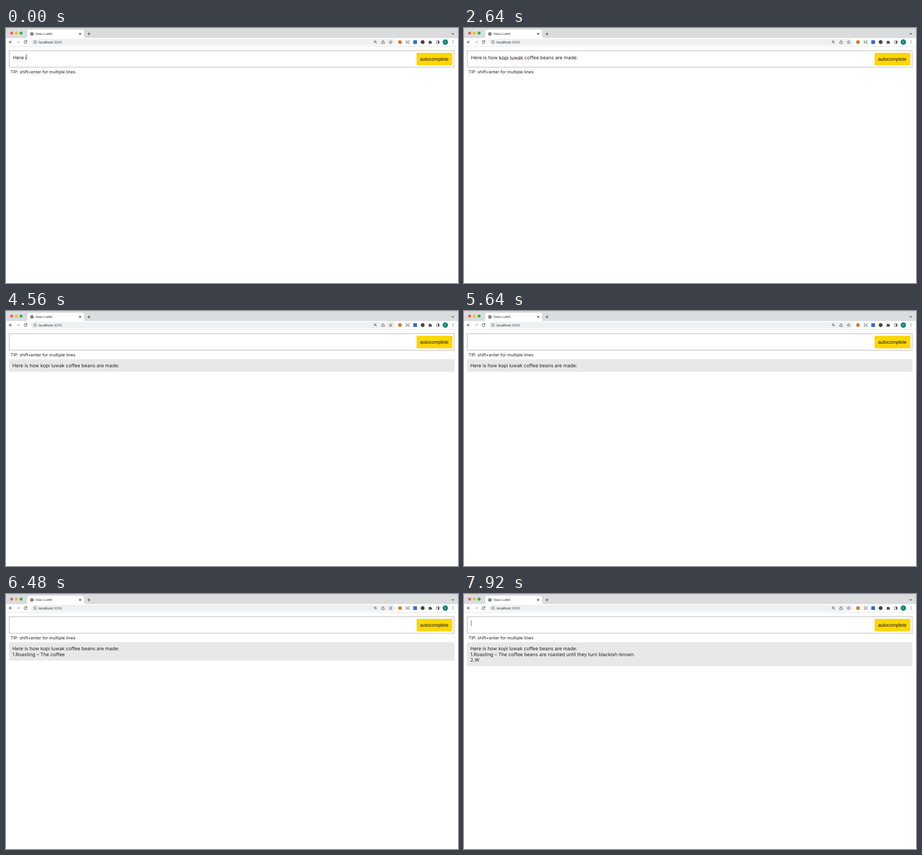
Recreate the animation shown at these times as an HTML page. Size 997 px wide and 562 px high, loop 8 s.

```html
<!DOCTYPE html>
<html lang="en">
<head>
<meta charset="utf-8">
<title>Autocomplete demo</title>
<style>
  html, body { margin: 0; width: 100%; height: 100%; overflow: hidden; background: #fff; }
  svg { display: block; width: 100%; height: 100%; }
  text { font-family: Inter, "Open Sans", sans-serif; fill: #222; white-space: pre; text-rendering: geometricPrecision; }
  .body { font-size: 10.55px; }
  .icon { fill: none; stroke: #505357; stroke-width: 1.1; }
  .solid { fill: #505357; stroke: none; }
</style>
</head>
<body>
<svg viewBox="0 0 997 562">
  <!-- tab strip -->
  <rect width="997" height="22" fill="#dadcde"/>
  <rect width="997" height="0.7" fill="#c4c6c8"/>
  <circle cx="12.4" cy="11.3" r="3.2" fill="#ed5f54"/>
  <circle cx="22.8" cy="11.3" r="3.2" fill="#f3bb2d"/>
  <circle cx="33.3" cy="11.3" r="3.2" fill="#27b73f"/>
  <path d="M43 22q4 0 4-4V8q0-4 4-4H168q4 0 4 4V18q0 4 4 4z" fill="#fff"/>
  <circle cx="57.2" cy="13" r="3.7" class="solid"/>
  <path d="M54.4 12.2l2 .6.8 1.6-.4 1.4M57.2 9.9l-.3 1.3 1.5.7 1.5-.6M58.4 15.4l1-1.6" fill="none" stroke="#fff" stroke-width=".9"/>
  <text x="65.4" y="15.1" font-size="6.25">Dalai LLaMA</text>
  <g class="icon">
    <path d="M161.4 10.9l4 4m0-4l-4 4M179.7 13h6.6M183 9.7v6.6" stroke="#333"/>
    <path d="M983.2 11.6l2.3 2.3 2.3-2.3" stroke="#333"/>
  </g>

  <!-- toolbar -->
  <rect y="22" width="997" height="18.5" fill="#fff"/>
  <rect x="55" y="24" width="804" height="14" rx="7" fill="#eff0f1"/>
  <rect y="40" width="997" height="0.8" fill="#dcdddf"/>
  <text x="72" y="33.7" font-size="7.3" fill="#333">localhost<tspan fill="#555">:3000</tspan></text>
  <g class="icon">
    <path d="M13.6 31H7.2m3.1-3.2L7 31l3.3 3.2"/>
    <path d="M23.4 31h6.4m-3.1-3.2L30 31l-3.3 3.2" stroke="#bbbdc0"/>
    <path d="M45.6 29.2a3.1 3.1 0 1 0 .5 2.5M46.2 27.6v2.3h-2.4"/>
    <circle cx="64" cy="31" r="3.3" stroke-width=".8"/>
    <path d="M64 30.6v2.2M64 29v.9" stroke-width=".9"/>
    <circle cx="814.2" cy="30.3" r="2.3" stroke-width=".9"/>
    <path d="M816 32.1l2.2 2.2M813.1 30.3h2.2" stroke-width=".9"/>
    <path d="M830 30.1h-1.3v4.1h5.8v-4.1h-1.3M831.6 32v-4.3m-1.5 1.4l1.5-1.5 1.5 1.5" stroke-width=".9"/>
    <path id="star" stroke-width=".9"/>
    <path d="M884 30v2.2h4V30zM882.3 29.5v-1.8h1.8M887.9 27.7h1.8v1.8M889.7 32.6v1.8h-1.8M884.1 34.4h-1.8v-1.8" stroke-width=".9"/>
    <rect x="949.2" y="28.2" width="6.2" height="5.8" rx=".6" stroke-width=".9"/>
    <rect x="952.6" y="28.2" width="2.8" height="5.8" class="solid"/>
    <path class="solid" d="M932 29h2.1a1.2 1.2 0 1 1 2.4 0h2.1v2a1.2 1.2 0 1 1 0 2.4v1.4h-2.2a1.2 1.2 0 0 0-2.3 0H932v-2.1a1.2 1.2 0 0 0 0-2.3z"/>
    <g class="solid"><circle cx="986" cy="28.4" r=".8"/><circle cx="986" cy="31.1" r=".8"/><circle cx="986" cy="33.8" r=".8"/></g>
  </g>
  <circle cx="869" cy="31" r="4" fill="#d9762f"/>
  <rect x="898.4" y="27" width="8.2" height="8.2" rx="1" fill="#2f6fd6"/>
  <circle cx="919" cy="31" r="4.3" fill="#4a4542"/>
  <circle cx="969" cy="31" r="5.9" fill="#078573"/>
  <text x="969" y="33.2" font-size="6" text-anchor="middle" style="fill:#d5ebe7">C</text>

  <!-- page -->
  <rect x="7.2" y="50" width="981.2" height="36.4" fill="#fff" stroke="#ccc" stroke-width="1.7"/>
  <rect x="905.6" y="54.6" width="79" height="28" rx="1.8" fill="#d8d0a0"/>
  <rect x="906.2" y="55" width="78" height="27" rx="1.5" fill="#ffd700"/>
  <text x="944.7" y="72" font-size="10.5" text-anchor="middle" style="font-family:'Liberation Sans',Arial,sans-serif;fill:#111">autocomplete</text>
  <text x="10" y="100.4" font-size="9.35">TIP: shift+enter for multiple lines</text>
  <text id="typed" class="body" x="15.4" y="68.7"></text>
  <g id="marks" stroke="#c0483f" stroke-width="1.1" stroke-dasharray="1.1 0.9"></g>
  <rect id="caret" y="58" width="1" height="13" fill="#555"/>
  <g id="answer">
    <rect id="panel" x="6.4" y="106.3" width="982.8" fill="#e8e8e8"/>
    <text class="body" x="14" y="124.3"></text>
    <text class="body" x="14" y="136.8"></text>
    <text class="body" x="14" y="149.3"></text>
  </g>
</svg>
<script>
const LOOP = 8000, STEP = 120, BLINK = 480;
const TYPED_AT = 2160, SENT_AT = 3120, REPLY_AT = 5880, TOKEN_MS = 88;
const PROMPT = "Here is how kopi luwak coffee beans are made:";
const MISSPELT = ["kopi", "luwak"];
const TOKENS = ["\n1", ".", "Ro", "asting", " –", " The", " coffee", " beans", " are", " ro", "asted",
  " until", " they", " turn", " black", "ish", "-", "b", "rown", ".", "\n", "2", ".", "W"];
// [time, characters typed]
const TYPING = [[0, 6], [1200, 26], [TYPED_AT, PROMPT.length]];
const FADE = ["#484848", "#383838", "#2b2b2b", "#222"];

const $ = id => document.getElementById(id);
const typed = $("typed"), marks = $("marks"), caret = $("caret"), answer = $("answer"), panel = $("panel");
const rows = [...answer.querySelectorAll("text")];

$("star").setAttribute("d", "M" + Array.from({ length: 10 }, (_, i) => {
  const r = i % 2 ? 1.7 : 3.6, a = i * Math.PI / 5;
  return `${848.4 + r * Math.sin(a)} ${31.2 - r * Math.cos(a)}`;
}).join("L") + "z");

function typedCount(t) {
  const i = t < TYPING[1][0] ? 0 : 1;
  const [t0, n0] = TYPING[i], [t1, n1] = TYPING[i + 1];
  return Math.floor(n0 + (n1 - n0) * Math.min(1, (t - t0) / (t1 - t0)));
}

function drawInput(t) {
  const text = t < SENT_AT ? PROMPT.slice(0, typedCount(t)) : "";
  typed.textContent = text;
  marks.innerHTML = MISSPELT.map(word => {
    const from = PROMPT.indexOf(word), to = from + word.length;
    if (text.length <= to) return "";
    const x1 = typed.getStartPositionOfChar(from).x, x2 = typed.getEndPositionOfChar(to - 1).x;
    return `<line x1="${x1}" x2="${x2}" y1="69.2" y2="69.2"/>`;
  }).join("");
  caret.setAttribute("x", 15.6 + (text ? typed.getComputedTextLength() : 0));
  const lastKey = t < SENT_AT ? Math.min(t, TYPED_AT) : SENT_AT;
  caret.style.visibility = Math.floor((t - lastKey) / BLINK) % 2 ? "hidden" : "visible";
}

function drawAnswer(t) {
  answer.style.visibility = t < SENT_AT ? "hidden" : "visible";
  const count = Math.max(0, Math.floor((t - REPLY_AT) / TOKEN_MS) + 1);
  const lines = (PROMPT + TOKENS.slice(0, count).join("")).trimEnd().split("\n");
  rows.forEach((row, i) => row.textContent = lines[i] || "");
  panel.setAttribute("height", 27.7 + 12.5 * (lines.length - 1));
  const shade = Math.floor((t - SENT_AT) / STEP);
  rows[0].style.fill = FADE[Math.max(0, Math.min(shade, FADE.length - 1))];
}

let shown = -1;
function frame() {
  const t = Math.floor(performance.now() % LOOP / STEP) * STEP;
  if (t !== shown) {
    shown = t;
    drawInput(t);
    drawAnswer(t);
  }
  requestAnimationFrame(frame);
}
frame();
</script>
</body>
</html>
```
